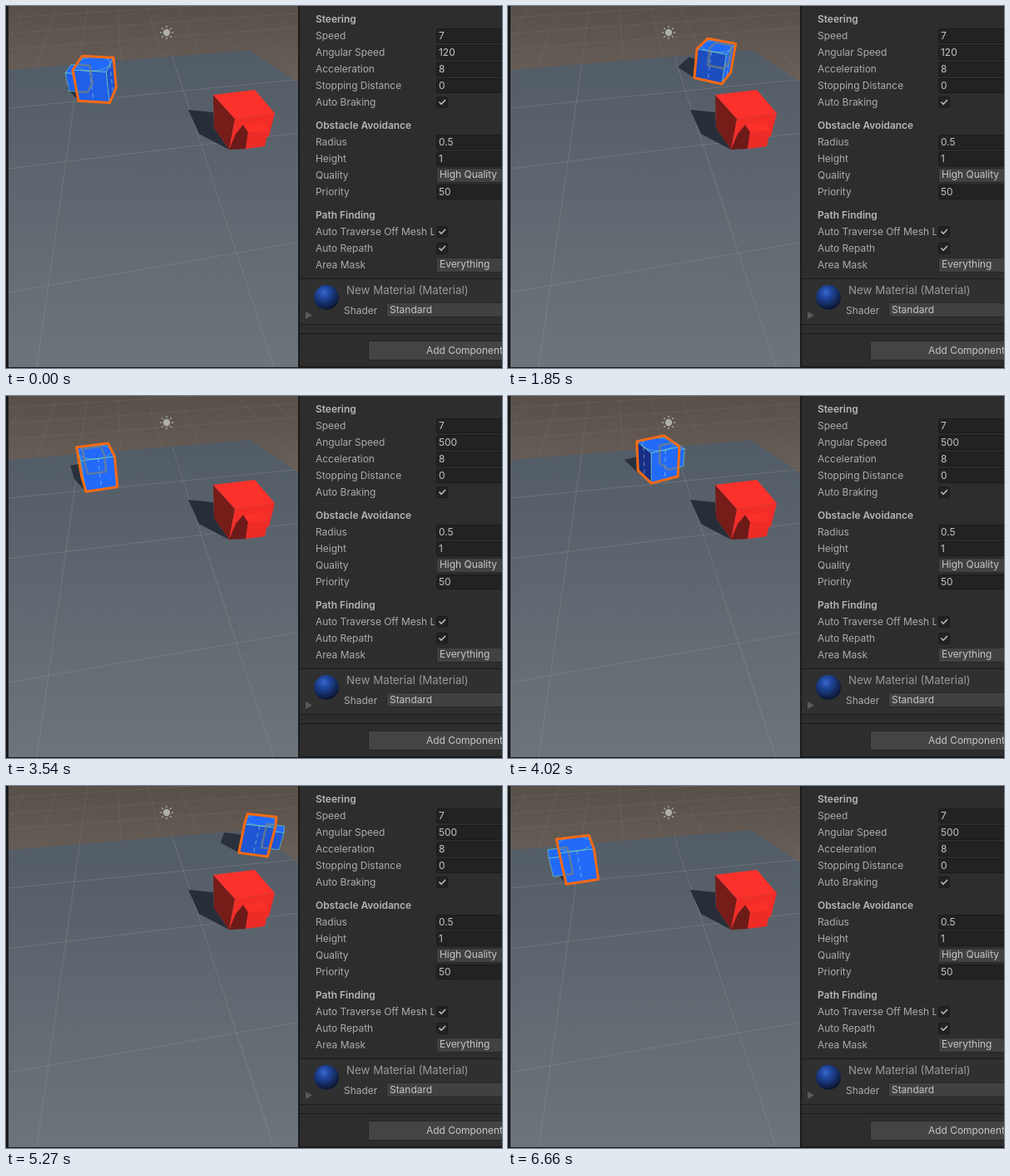
Write an HTML page with a canvas that moves like this. It is 596 px wide and 436 px high and loops after 7260 ms.

```html
<!DOCTYPE html>
<html lang="en">
<head>
<meta charset="utf-8">
<title>Agent steering</title>
<style>
  html, body { margin: 0; width: 100%; height: 100%; overflow: hidden; background: #191919; }
  canvas, svg { position: absolute; left: 0; top: 0; width: 596px; height: 436px; }
  text { font: 11.95px Inter, Roboto, sans-serif; fill: #acacac; }
  .head { font-weight: 600; fill: #b6b6b6; }
  .value { fill: #c6c6c6; }
</style>
</head>
<body>
<canvas id="scene" width="596" height="436"></canvas>
<svg id="panel" viewBox="0 0 596 436">
  <defs>
    <radialGradient id="ball" cx=".4" cy=".3" r=".68">
      <stop offset="0" stop-color="#3a68cc"/>
      <stop offset=".3" stop-color="#2149a2"/>
      <stop offset="1" stop-color="#0c1733"/>
    </radialGradient>
    <clipPath id="labels"><rect x="353" width="161.5" height="436"/></clipPath>
  </defs>
  <rect x="351" width="245" height="436" fill="#191919"/>
  <rect x="353" width="243" height="434" fill="#2d2d2d"/>
  <rect x="353" y="328" width="243" height="1" fill="#1a1a1a"/>
  <rect x="353" y="329" width="243" height="54" fill="#303030"/>
  <rect x="353" y="383" width="243" height="1" fill="#1c1c1c"/>
  <rect x="353" y="394" width="243" height="1" fill="#191919"/>
  <circle cx="385" cy="351" r="15" fill="url(#ball)"/>
  <path d="M360 368L368 372.5L360 377Z" fill="#5a5a5a"/>
  <text x="409" y="347" style="font-size:13.3px;fill:#999">New Material (Material)</text>
  <text x="406" y="371">Shader</text>
  <rect x="457.5" y="357.5" width="150" height="17" rx="2" fill="#414141" stroke="#282828"/>
  <text x="461" y="370" class="value">Standard</text>
  <rect x="435.5" y="403.5" width="180" height="23" rx="2" fill="#444" stroke="#262626"/>
  <text x="505" y="419" class="value">Add Component</text>
  <g id="rows"></g>
</svg>
<script>
// ---------- inspector ----------
const groups = {
  "Steering": { "Speed": "7", "Angular Speed": "120", "Acceleration": "8",
    "Stopping Distance": "0", "Auto Braking": true },
  "Obstacle Avoidance": { "Radius": "0.5", "Height": "1", "Quality": "High Quality", "Priority": "50" },
  "Path Finding": { "Auto Traverse Off Mesh Link": true, "Auto Repath": true, "Area Mask": "Everything" }
};

const label = (text, y, cls = "") =>
  `<text x="372" y="${y}" class="${cls}" clip-path="url(#labels)">${text}</text>`;

function control(value, y) {
  if (value === true)
    return `<rect x="517.5" y="${y - 10.5}" width="13" height="13" rx="2" fill="#222" stroke="#1a1a1a"/>
      <path d="M520.5 ${y - 4.4}l2.5 2.6l5 -5.2" fill="none" stroke="#c4c4c4" stroke-width="1.5"/>`;
  const menu = isNaN(value);
  return `<rect x="517.5" y="${y - 12.5}" width="90" height="17" rx="2"
      fill="${menu ? "#414141" : "#222"}" stroke="${menu ? "#282828" : "#1a1a1a"}"/>
    <text class="value" x="${menu ? 521 : 520}" y="${menu ? y - 1 : y}">${value}</text>`;
}

let markup = "", rowY = 20;
for (const [title, fields] of Object.entries(groups)) {
  markup += label(title, rowY, "head");
  for (const [name, value] of Object.entries(fields)) {
    rowY += 20;
    markup += `<g data-name="${name}">${label(name, rowY)}${control(value, rowY)}</g>`;
  }
  rowY += 28;
}
document.getElementById("rows").innerHTML = markup;
const turnValue = document.querySelector('[data-name="Angular Speed"] .value');

// ---------- drawing helpers ----------
const ctx = document.getElementById("scene").getContext("2d");

function trace(pts, closed = true) {
  ctx.beginPath();
  for (const p of pts) ctx.lineTo(...p);
  if (closed) ctx.closePath();
}
function fill(pts, color) {
  trace(pts);
  ctx.fillStyle = color;
  ctx.fill();
}
function stroke(pts, color, width = 1, closed = true) {
  trace(pts, closed);
  ctx.strokeStyle = color;
  ctx.lineWidth = width;
  ctx.lineJoin = "round";
  ctx.stroke();
}
function inside(pts, draw) {
  ctx.save();
  trace(pts);
  ctx.clip();
  draw();
  ctx.restore();
}
function gradient(y0, y1, a, b) {
  const g = ctx.createLinearGradient(0, y0, 0, y1);
  g.addColorStop(0, a);
  g.addColorStop(1, b);
  return g;
}
function hull(points) {
  const p = [...points].sort((a, b) => a[0] - b[0] || a[1] - b[1]);
  const half = list => {
    const h = [];
    for (const q of list) {
      while (h.length > 1) {
        const [a, b] = h.slice(-2);
        if ((b[0] - a[0]) * (q[1] - a[1]) - (b[1] - a[1]) * (q[0] - a[0]) > 0) break;
        h.pop();
      }
      h.push(q);
    }
    return h.slice(0, -1);
  };
  return [...half(p), ...half(p.reverse())];
}

// ---------- camera: 60 degree lens looking 45 degrees down ----------
const F = 378, CX = 177, CY = 218, S = Math.SQRT1_2, DROP = 4.3;

function project([x, y, z]) {
  const d = (z - y) * S;
  return [CX + F * x / d, CY - F * (y + z) * S / d];
}
function unproject(sx, sy) {
  const u = (CY - sy) / F, d = DROP / (S * (1 - u));
  return [d * (sx - CX) / F, -DROP, d * S * (u + 1)];
}

// Maps local (right, up, forward) to world
function frameAt([x, y, z], yaw) {
  const s = Math.sin(yaw), c = Math.cos(yaw);
  return {
    point: (a, b, f) => [x + a * c + f * s, y + b, z - a * s + f * c],
    dir: (a, b, f) => [a * c + f * s, b, f * c - a * s]
  };
}
const dot = (a, b) => a[0] * b[0] + a[1] * b[1] + a[2] * b[2];
const LIGHT = [.36, .73, -.58];
const SIDES = [[1, 0, 0], [-1, 0, 0], [0, 0, 1], [0, 0, -1], [0, 1, 0]];
const QUAD = [[-1, -1], [1, -1], [1, 1], [-1, 1]];

function blue(n) {
  const k = Math.min(1, Math.max(0, dot(n, LIGHT)) / .62) ** 1.2;
  const mix = (a, b) => Math.round(a + (b - a) * k);
  return `rgb(${mix(22, 34)},${mix(46, 106)},${mix(135, 250)})`;
}
function corners(fr, r, mid = 0) {
  return [-r, r].flatMap(b => QUAD.map(([i, j]) => fr.point(i * r, b, mid + j * r)));
}
function drawBox(fr, r, mid) {
  for (const n of SIDES) {
    const normal = fr.dir(...n);
    if (dot(normal, fr.point(n[0] * r, n[1] * r, mid + n[2] * r)) >= 0) continue;
    const quad = QUAD.map(([i, j]) => {
      const v = n[0] ? [n[0], i, j] : n[1] ? [i, n[1], j] : [i, j, n[2]];
      return project(fr.point(v[0] * r, v[1] * r, mid + v[2] * r));
    });
    fill(quad, blue(normal));
    stroke(quad, "rgba(130,230,180,.62)", .9);
  }
}

// ---------- static scene ----------
const FLOOR = [[3, 77], [293, 53], [351, 92], [351, 435], [3, 435]];

// Line through a point and a vanishing point, drawn past both ends
function ray(x, y, vx, color) {
  const vy = -174;
  stroke([[vx, vy], [x + (x - vx) * 3, y + (y - vy) * 3]], color, 1, false);
}
const across = (y, color) => ray(3, y, 3000, color);
const along = (x, y, color) => ray(x, y, 123, color);

function drawGround() {
  ctx.fillStyle = gradient(0, 90, "#584f49", "#685f59");
  ctx.fillRect(3, 0, 348, 435);
  const skyLine = "rgba(190,180,170,.1)";
  for (let x = -10; x < 340; x += 36) along(x, 0, skyLine);
  for (let y = 14; y < 60; y += 19) across(y, skyLine);
  inside(FLOOR, () => {
    ctx.fillStyle = gradient(55, 435, "#525c66", "#6d747b");
    ctx.fillRect(3, 40, 348, 395);
    const line = "rgba(180,170,168,.24)";
    for (const x of [37, 322]) along(x, 435, line);
    for (const y of [123, 196, 345]) across(y, line);
  });
}
function drawSun() {
  const color = "#adb0a3";
  ctx.fillStyle = color;
  ctx.beginPath();
  ctx.arc(193, 32, 4.2, 0, 7);
  ctx.fill();
  for (let a = 0; a < 6.2; a += Math.PI / 4) {
    const at = r => [193 + r * Math.cos(a), 32 + r * Math.sin(a)];
    stroke([at(5.8), at(8.2)], color, 1.3, false);
  }
}
function drawRed() {
  const left = [249, 107], back = [299, 101], right = [323, 129], front = [275, 136];
  const foot = [268, 173], leftFoot = [250, 147], rightFoot = [316, 157];
  const noseTop = [285, 143], noseEdge = [291, 152], noseFoot = [288, 172], noseRight = [315, 150];
  fill([[219, 125], [249, 128], leftFoot, foot, [232, 154]], "#272e39");
  fill([left, front, foot, leftFoot], "#761c19");
  fill([front, right, rightFoot, foot], "#f22d28");
  fill([left, back, right, front], "#fd312b");
  fill([noseTop, noseEdge, noseFoot, foot, [276, 154]], "#6c1b19");
  fill([noseEdge, noseRight, [311, 169], noseFoot], "#ee2c27");
  fill([noseTop, [310, 140], noseRight, noseEdge], "#fa3029");
}

// ---------- moving agent ----------
// Two patrols, each out and back; the second turns faster
const patrols = [
  { start: 0, go: 330, rate: 120, delay: 0, legs: [
    { t: [330, 1600], x: [108, 260], yaw: [-83, 65], lag: 1.2, sag: 3 },
    { t: [1540, 2870], x: [260, 97], yaw: [64, -110], lag: 1.2, sag: 0 }] },
  { start: 2940, go: 3270, rate: 500, delay: 130, legs: [
    { t: [3270, 5020], x: [97, 306], yaw: [-90, 62], lag: 1, sag: 1 },
    { t: [5050, 6800], x: [306, 78], yaw: [62, 253], lag: 1.2, sag: 0 }] }
];
const LOOP = 7260, STEP = 69, LAST = 6660;
const clamp = (v, a, b) => Math.min(b, Math.max(a, v));
const swing = u => (1 - Math.cos(Math.PI * u)) / 2;

function pose(t) {
  const { start, go, rate, delay, legs } = patrols[t < patrols[1].start ? 0 : 1];
  const end = start ? LAST : legs[1].t[1];
  const now = clamp(go + STEP * Math.floor((t - go) / STEP + .25), go, end);
  const { t: [t0, t1], x: [x0, x1], yaw: [a, b], lag, sag } = legs[now < legs[1].t[0] ? 0 : 1];
  const u = clamp((now - t0) / (t1 - t0), 0, 1);
  const x = x0 + (x1 - x0) * swing(u ** lag);
  const turned = Math.max(0, now - t0 - delay) / 1000 * rate;
  const yaw = a + Math.sign(b - a) * Math.min(turned, Math.abs(b - a));
  return { x, y: 85 + (110 - x) * .135 + sag * (1 - u), yaw: yaw * Math.PI / 180 };
}

function drawAgent(t) {
  const { x, y, yaw } = pose(t);
  const R = .47, NOSE = .28;
  const fr = frameAt(unproject(x, y), yaw);
  const body = corners(fr, R);
  const outline = hull(body.map(project));
  const nose = hull(corners(fr, NOSE, .5).map(project));

  const cast = body.map(([a, b, c], i) => i < 4 ? [a, b, c] : [a - .5, b - 2 * R, c + .8]);
  inside(FLOOR, () => fill(hull(cast.map(project)), "#29313c"));

  const noseInFront = Math.cos(yaw) < -.35;
  if (!noseInFront) drawBox(fr, NOSE, .5);
  drawBox(fr, R, 0);

  // cylinder gizmo
  const ring = Array.from({ length: 28 }, (_, i) => {
    const a = i * Math.PI / 14;
    return project(fr.point(R * Math.cos(a), R, R * Math.sin(a)));
  });
  stroke(ring, "rgba(150,225,150,.55)", .9);
  ctx.setLineDash([5, 4]);
  for (const [a, , f] of SIDES.slice(0, 4)) {
    if (dot(fr.dir(a, 0, f), fr.point(a * R, 0, f * R)) < 0)
      stroke([R, -R].map(b => project(fr.point(a * R, b, f * R))), "rgba(200,230,200,.5)", 1, false);
  }
  ctx.setLineDash([]);

  stroke(outline, "#fb6a12", 3);
  if (noseInFront) drawBox(fr, NOSE, .5);
  else inside(outline, () => stroke(nose, "rgba(118,130,128,.7)", 2.6));
}

// ---------- playback ----------
function render(t) {
  turnValue.textContent = t < patrols[1].start ? "120" : "500";
  ctx.clearRect(0, 0, 596, 436);
  inside([[3, 0], [351, 0], [351, 435], [3, 435]], () => {
    drawGround();
    drawSun();
    drawAgent(t);
    drawRed();
  });
}
const began = performance.now();
function tick() {
  render((performance.now() - began) % LOOP);
  requestAnimationFrame(tick);
}
tick();
</script>
</body>
</html>
```
